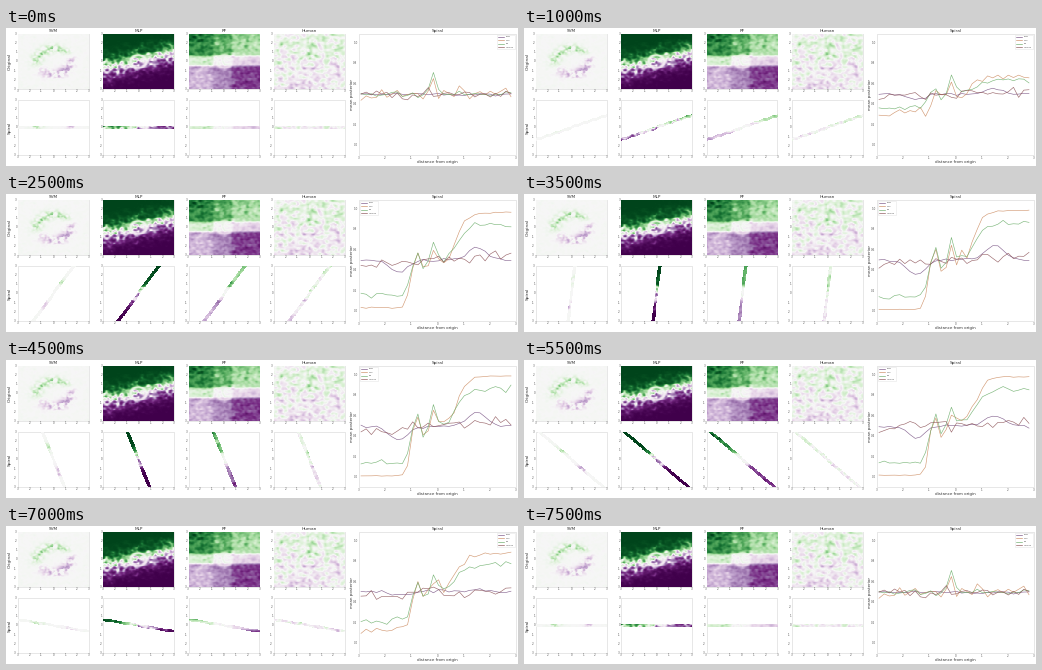
Animation, 512 px wide and 138 px high, one loop 8000 ms. Source, as a matplotlib script:

```python
import numpy as np
import matplotlib.pyplot as plt
from matplotlib.animation import FuncAnimation
from matplotlib.patches import Rectangle

W, H, DPI = 512, 138, 100
FRAMES, INTERVAL = 16, 500
PX = 72 / DPI
N = 72
MODELS = ["SVM", "MLP", "RF", "Human"]
COLORS = ["#70487c", "#c98558", "#62a860", "#85484d"]
LEFTS = np.linspace(12, 268, 4)
PANEL_W, PANEL_H = 70.7, 55
TOPS = [6, 72]
CHART_X, CHART_Y, CHART_W, CHART_H = 353, 6, 157, 121

fig = plt.figure(figsize=(W / DPI, H / DPI), dpi=DPI, facecolor="white")
ax = fig.add_axes([0, 0, 1, 1])
ax.set_axis_off()

axis = np.linspace(-3, 3, N)
X, Y = np.meshgrid(axis, -axis)
R = np.hypot(X, Y)


def smooth_noise(seed, sigma):
    noise = np.random.default_rng(seed).normal(size=(N, N))
    f = np.fft.fftfreq(N)
    kernel = np.exp(-2 * (np.pi * sigma) ** 2 * (f[:, None] ** 2 + f ** 2))
    noise = np.fft.ifft2(np.fft.fft2(noise) * kernel).real
    return noise / noise.std()


def bump(v, centre, width):
    return np.exp(-((v - centre) / width) ** 2)


def step(v, edge, width=0.1):
    return 0.5 + 0.5 * np.tanh((v - edge) / width)


def fade_ring(p, strength):
    return 0.5 + (p - 0.5) * (1 - strength * bump(R, 0.7, 0.16))


def svm_field():
    side = np.tanh(1.6 * (Y - 0.5 * X))
    speckle = np.clip(0.6 + 0.5 * smooth_noise(1, 1.0), 0, 1.5)
    return 0.505 + 0.16 * bump(R, 1.4, 0.5) * side * speckle + 0.004 * smooth_noise(2, 1)


def mlp_field():
    margin = Y - 0.28 * X
    p = 0.5 + 0.5 * np.tanh(1.1 * margin + 0.3 * smooth_noise(3, 1.2))
    return fade_ring(p, 0.85)


def rf_field():
    row = 0.27 * (step(Y, 0.6) - step(-Y, 0.5)) + 0.04 * step(Y, 2.2)
    column = 0.1 - 0.1 * step(X, -1) - 0.1 * step(X, 0.65)
    p = 0.5 + row + column + 0.03 * smooth_noise(4, 1.2)
    return fade_ring(p, 0.6)


def human_field():
    p = 0.5 + 0.045 * np.tanh(Y) + 0.055 * smooth_noise(5, 1.4)
    return p + 0.09 * np.tanh(2 * Y) * bump(R, 0.8, 0.15)


FIELDS = [np.clip(f(), 0, 1) for f in (svm_field, mlp_field, rf_field, human_field)]

CURVE_X = np.linspace(355, 505, 30)
RADII = (CURVE_X - CHART_X) * 6 / CHART_W - 3


def posteriors(angle):
    theta = np.radians(angle % 180)
    rng = np.random.default_rng(int(angle % 180) + 7)
    jitter = rng.normal(size=(4, len(RADII)))
    # The class boundary is tilted, so the contrast along the line peaks past vertical.
    contrast = np.tanh(2.2 * max(np.sin(theta) - 0.25 * np.cos(theta), 0))
    climb = contrast * (step(RADII, 0.75, 0.4) - step(-RADII, 1.05, 0.15))
    wiggle = 0.13 * contrast * (bump(RADII, -0.74, 0.15) - bump(RADII, -0.5, 0.15))
    peak = bump(RADII, -0.17, 0.16)
    mlp = 0.5 + 0.5 * climb + wiggle + 0.1 * peak
    rf = 0.5 + 0.37 * climb + wiggle + 0.19 * peak
    svm = 0.5 + 0.14 * np.sin(theta) * (bump(RADII, 1.5, 0.5) - bump(RADII, -1.5, 0.5))
    human = 0.5 + 0.02 * np.sin(theta) * RADII
    mlp += 0.16 * np.clip(mlp * (1 - mlp), 0, 1) * jitter[1]
    return np.clip([svm + 0.008 * jitter[0], mlp, rf + 0.018 * jitter[2],
                    human + 0.028 * jitter[3]], 0, 1)


def label(x, y, text, size, **kw):
    kw = {"ha": "center", "va": "center", "color": "#333333", **kw}
    return ax.text(x, y, text, fontsize=size * PX, family="DejaVu Sans", **kw)


def tick_label(x, y, text, **kw):
    label(x, y, text, 2.7, color="#555555", **kw)


def frame_box(x, y, w, h):
    ax.add_patch(Rectangle((x, y), w, h, fill=False, ec="#d0d0d0", lw=0.5 * PX, zorder=2))


def panel_image(data, left, top):
    return ax.imshow(data, cmap="PRGn", vmin=0, vmax=1, aspect="auto", interpolation="nearest",
                     extent=(left, left + PANEL_W, top + PANEL_H, top), zorder=3)


strips = []
for name, left, field in zip(MODELS, LEFTS, FIELDS):
    label(left + PANEL_W / 2, 3, name, 4.2)
    panel_image(field, left, TOPS[0])
    strips.append(panel_image(np.ma.masked_all((N, N)), left, TOPS[1]))
    for top in TOPS:
        frame_box(left, top, PANEL_W, PANEL_H)
        for tick in range(-3, 4):
            share = (tick + 3) / 6
            tick_label(left + share * PANEL_W, top + PANEL_H + 2.5, tick)
            tick_label(left - 1, top + (1 - share) * PANEL_H, tick, ha="right")

for row_name, top in zip(("Original", "Spiral"), TOPS):
    label(4, top + PANEL_H / 2, row_name, 4.4, rotation=90)

frame_box(CHART_X, CHART_Y, CHART_W, CHART_H)
label(431.5, 3, "Spiral", 4.2)
label(431.5, 134.5, "distance from origin", 4)
label(346, 66, "mean posterior", 4, rotation=90)
for tick in range(-3, 4):
    tick_label(CHART_X + (tick + 3) * CHART_W / 6, 129.7, tick)
for tick in np.linspace(0, 1, 6):
    tick_label(351.5, 117 - 102 * tick, f"{tick:.1f}", ha="right")

curves = [ax.plot([], [], color=c, lw=0.6 * PX, alpha=0.85, zorder=3)[0] for c in COLORS]
legend_box = Rectangle((0, 6.8), 18, 14.5, fc="white", ec="#dddddd", lw=0.5 * PX, alpha=0.8, zorder=5)
ax.add_patch(legend_box)
legend_keys = [ax.plot([], [], color=c, lw=0.6 * PX, zorder=6)[0] for c in COLORS]
legend_names = [label(0, 8.8 + 3.5 * k, m, 2.2, ha="left", color="#555555", zorder=6)
                for k, m in enumerate(MODELS)]

ax.set_xlim(0, W)
ax.set_ylim(H, 0)


def place_legend(x):
    legend_box.set_x(x)
    for k, (key, text) in enumerate(zip(legend_keys, legend_names)):
        key.set_data([x + 1, x + 7], [8.8 + 3.5 * k] * 2)
        text.set_x(x + 9)


def update(i):
    angle = 180 * i / (FRAMES - 1)
    theta = np.radians(angle)
    off_line = np.abs(Y * np.cos(theta) - X * np.sin(theta)) > 0.15
    for strip, field in zip(strips, FIELDS):
        strip.set_data(np.ma.masked_array(field, off_line))
    for curve, values in zip(curves, posteriors(angle)):
        curve.set_data(CURVE_X, 117 - 102 * values)
    place_legend(354 if 60 <= angle <= 144 else 490.5)
    return strips + curves


anim = FuncAnimation(fig, update, frames=FRAMES, interval=INTERVAL, repeat=True, repeat_delay=0)
plt.show()
```
